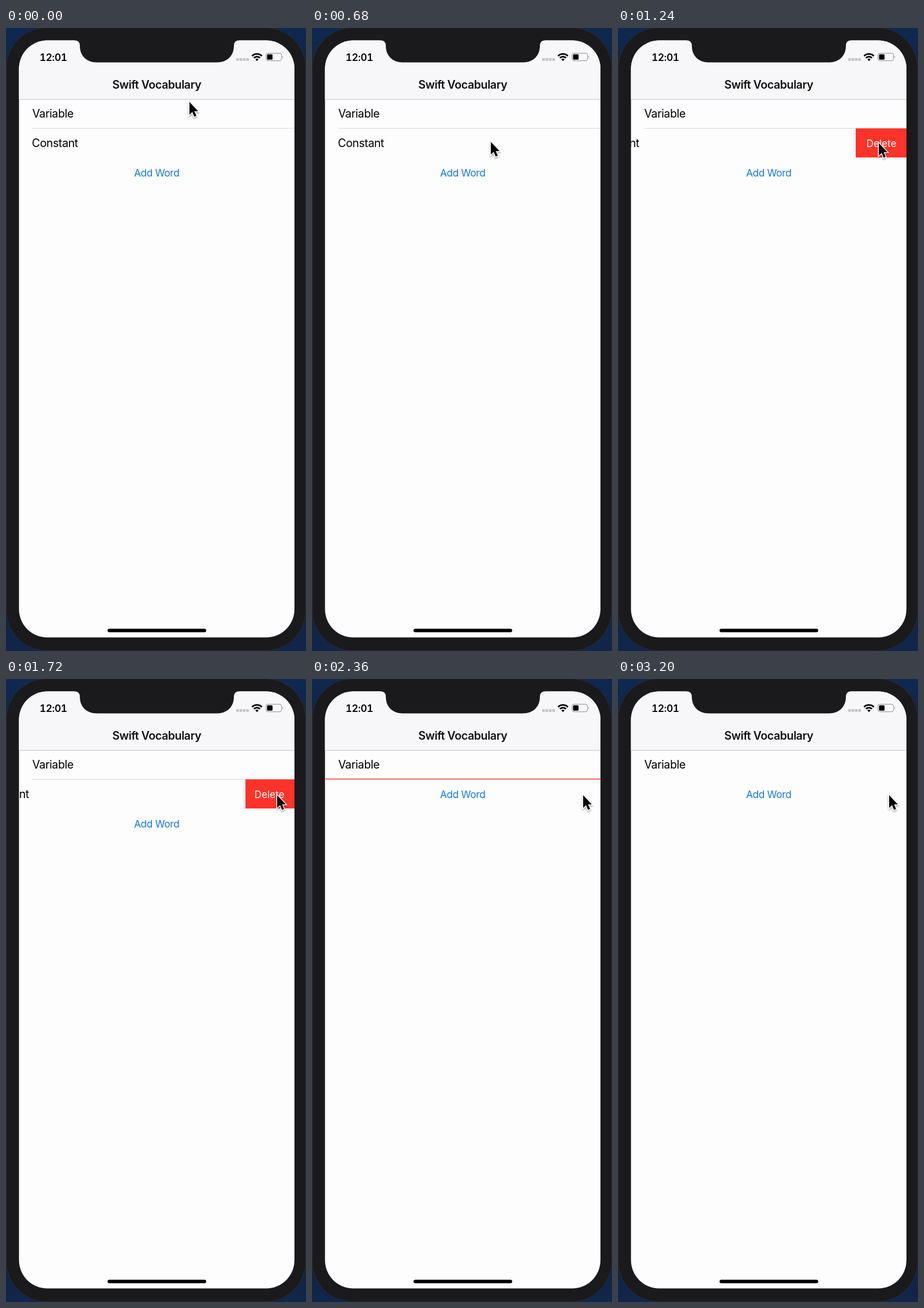
Animation of 520 by 1078 pixels, one loop 3240 ms. Source, as an HTML page:

```html
<!DOCTYPE html>
<html lang="en">
<head>
<meta charset="utf-8">
<title>Swift Vocabulary</title>
<style>
  html, body { margin: 0; width: 100%; height: 100%; overflow: hidden; background: #10264a; }
  svg { display: block; font-family: Inter, "Noto Sans", sans-serif; }
  .body { font-size: 19.6px; letter-spacing: -.43px; }
  .small { font-size: 17.3px; }
  .bold { font-weight: 600; }
  .mid { text-anchor: middle; }
</style>
</head>
<body>
<svg width="520" height="1078" viewBox="0 0 520 1078">
  <defs>
    <linearGradient id="desk" x2="0" y2="1">
      <stop stop-color="#10284f"/><stop offset=".5" stop-color="#0b1524"/><stop offset="1" stop-color="#11264a"/>
    </linearGradient>
    <clipPath id="screen"><rect x="22.5" y="21.5" width="477.5" height="1033" rx="49"/></clipPath>
    <clipPath id="rowClip"><rect id="rowBox" x="22" y="173.7" width="479" height="50.3"/></clipPath>
    <filter id="shadow" x="-50%" y="-30%" width="200%" height="180%">
      <feDropShadow dx="0" dy="2" stdDeviation="1.6" flood-opacity=".4"/>
    </filter>
  </defs>

  <rect width="520" height="1078" fill="url(#desk)"/>
  <rect x=".5" y="-.5" width="519" height="1078" rx="70" fill="#1a191c" stroke="#2b2c30"/>

  <g clip-path="url(#screen)">
    <rect x="22" y="21" width="479" height="1034" fill="#fefdfe"/>
    <rect x="22" y="21" width="479" height="102" fill="#f7f6f9"/>
    <path d="M22 123.5H501" stroke="#c5c4c7"/>
    <text class="body bold mid" x="261.3" y="104.8" fill="#111">Swift Vocabulary</text>
    <text class="body" x="45.5" y="155">Variable</text>
    <path id="separator" d="M46 173.5H501" stroke="#d5d4d8"/>

    <g clip-path="url(#rowClip)">
      <text id="word" class="body" x="44.8" y="206">Constant</text>
      <g id="action">
        <rect id="red" y="173" width="480" height="52" fill="#ff3329"/>
        <text id="label" class="small" y="205.8" fill="#fff" letter-spacing="-.05">Delete</text>
      </g>
    </g>
    <path id="redLine" stroke="#e56057"/>
    <text id="add" class="small mid" x="261.2" y="256.6" fill="#1479e4" letter-spacing="-.33">Add Word</text>
    <rect x="176" y="1039.5" width="171" height="6" rx="3"/>
  </g>

  <path d="M118 21Q128 21 128 31C128 48 140 59.5 157 59.5H366C383 59.5 395 48 395 31Q395 21 405 21Z" fill="#1a191c"/>
  <text class="small bold mid" x="82" y="56.6" letter-spacing="-.35" style="font-variant-numeric:tabular-nums">12:01</text>
  <path d="M399 54.5H421" stroke="#c3c2c5" stroke-width="4.5" stroke-dasharray="4.6 1.2"/>
  <g fill="none" stroke="#000" stroke-width="2.8">
    <path d="M426.5 48.4A12 12 0 0 1 443.5 48.4M429.7 51.8A7.5 7.5 0 0 1 440.3 51.8"/>
    <path d="M432.2 54.3A4 4 0 0 1 437.8 54.3L435 57.2Z" fill="#000" stroke="none"/>
  </g>
  <rect x="450.6" y="43.6" width="27" height="13" rx="3.6" fill="none" stroke="#a2a1a4" stroke-width="1.2"/>
  <rect x="452.5" y="45.5" width="9.5" height="9.2" rx="1.5"/>
  <path d="M479.2 48Q481.6 50 479.2 52.3Z" fill="#a2a1a4"/>

  <g id="cursor" filter="url(#shadow)">
    <path d="M1 2V24L6 19.2L9.4 27.4L13 25.8L9.6 17.9H16Z" stroke="#fff" stroke-width="2.6" paint-order="stroke"/>
  </g>
</svg>
<script>
const LOOP = 3240, STEP = 40, OPEN = 85, DELETE_AT = 1900, DELETE_MS = 400;
const $ = id => document.getElementById(id);
const set = (id, attrs) => { for (const k in attrs) $(id).setAttribute(k, attrs[k]); };
const clamp = v => Math.min(1, Math.max(0, v));
const smooth = u => u * u * (3 - 2 * u);

// Eased interpolation through [time, value] keys.
function track(keys, t) {
  let value = keys[0][1];
  for (let i = 1; i < keys.length; i++) {
    const [t0, v0] = keys[i - 1], [t1, v1] = keys[i];
    if (t >= t0) value = v0 + (v1 - v0) * smooth(clamp((t - t0) / (t1 - t0)));
  }
  return value;
}

const cursorX = [[0, 317], [480, 309], [700, 309], [940, 191], [1000, 191], [1240, 451], [1480, 469]];
const cursorY = [[0, 126], [480, 195], [1000, 195], [1240, 197], [1480, 199]];
const swipe = [[700, 0], [940, 118], [1240, 88], [1400, OPEN]];

function draw(t) {
  const u = clamp((t - DELETE_AT) / DELETE_MS);
  const collapse = 50.8 * smooth(u);
  const offset = track(swipe, t) + (478 - OPEN) * (1 - (1 - u) ** 1.8);
  const left = 500 - offset;
  const deleting = t > DELETE_AT;

  set('cursor', { transform: `translate(${track(cursorX, t)} ${track(cursorY, t)})` });
  set('word', { transform: `translate(${-offset})` });
  set('red', { x: left });
  set('label', { x: deleting ? left + 16 : Math.max(left + 15.5, 430.5) });
  set('action', { visibility: offset > 0 ? 'visible' : 'hidden' });
  set('rowBox', { height: Math.max(0, 50.3 - collapse) });
  set('add', { transform: `translate(0 ${-collapse})` });
  set('separator', { visibility: u > .2 ? 'hidden' : 'visible' });
  set('redLine', {
    d: u < 1 ? 'M36 173.3H430' : 'M22 173.2H501',
    'stroke-width': u < 1 ? 1 : 1.7,
    opacity: u < 1 ? .65 : 1,
    visibility: u > .2 && t < 2480 ? 'visible' : 'hidden'
  });
}

function tick() {
  draw(Math.floor(performance.now() % LOOP / STEP) * STEP);
  requestAnimationFrame(tick);
}
tick();
</script>
</body>
</html>
```
